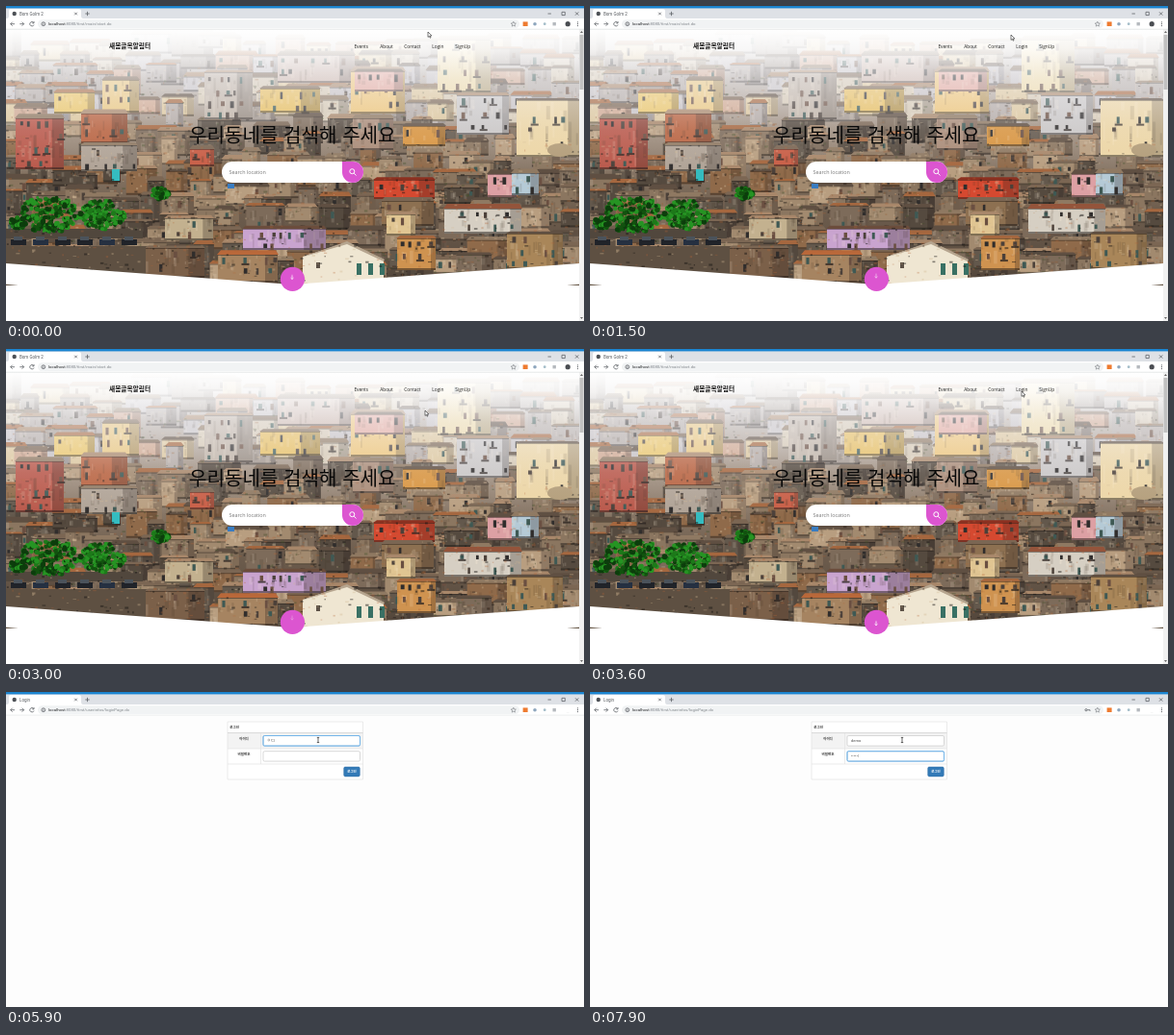
An HTML page with a canvas that plays this animation: 600 by 328 pixels, repeating every 8 s.

```html
<!DOCTYPE html>
<html lang="ko">
<head>
<meta charset="utf-8">
<title>Bom Golm 2</title>
<style>
html, body { margin: 0; width: 100%; height: 100%; overflow: hidden; background: #fff; }
canvas, svg { position: absolute; left: 0; top: 0; }
text { font-family: Roboto, "Noto Sans CJK KR", sans-serif; white-space: pre; }
.ko { font-family: "Noto Sans CJK KR", "Noto Sans CJK", sans-serif; }
.nav text { font: 500 4.8px "Open Sans", sans-serif; fill: #222; }
.url { font-size: 4.3px; fill: #80868b; }
.url tspan { fill: #202124; }
.tab { font-size: 4.5px; fill: #55595d; }
.label { font-size: 3.5px; font-weight: 700; fill: #333; }
.line { fill: none; stroke: #5f6368; stroke-width: .8; }
.field { fill: #fff; stroke: #c8c8c8; stroke-width: .7; }
.focus { fill: none; stroke: #66afe9; stroke-width: .8; filter: drop-shadow(0 0 .6px #9ccbf0); }
.typed { font-size: 4px; fill: #444; }

#login, #hover, #focus1, #focus2, #key, #pointer, #beam { animation: 8s step-end infinite; }
#login { animation-name: login; }
#hover { animation-name: hover; }
#focus1 { animation-name: focus1; }
#focus2 { animation-name: focus2; }
#key { animation-name: key; }
#pointer { animation-name: pointer; }
#beam { animation-name: beam; }
#cursor { animation: move 8s ease-in-out infinite; }
#arrow { animation: drop 1.6s -.3s ease-out infinite; }

@keyframes login { 0% { visibility: hidden } 50%, 100% { visibility: visible } }
@keyframes hover { 0% { opacity: 0 } 57.5%, 100% { opacity: 1 } }
@keyframes focus1 { 0% { opacity: 0 } 63.75% { opacity: 1 } 86.25%, 100% { opacity: 0 } }
@keyframes focus2 { 0% { opacity: 0 } 86.25%, 100% { opacity: 1 } }
@keyframes key { 0% { opacity: 0 } 88.75%, 100% { opacity: 1 } }
@keyframes pointer { 0% { opacity: 1 } 58%, 100% { opacity: 0 } }
@keyframes beam { 0% { opacity: 0 } 58%, 100% { opacity: 1 } }
@keyframes move {
  0%, 12% { transform: translate(438px, 27px) }
  17%, 19% { transform: translate(437px, 30px) }
  28%, 29% { transform: translate(344px, 91px) }
  37.5% { transform: translate(435px, 64px) }
  44%, 52.5% { transform: translate(448px, 44px) }
  60%, 100% { transform: translate(324px, 50px) }
}
@keyframes drop {
  0% { transform: translate(297px, 279px); opacity: 0 }
  25% { opacity: 1 }
  70% { opacity: 1 }
  100% { transform: translate(297px, 290px); opacity: 0 }
}
</style>
</head>
<body>
<canvas id="photo" width="600" height="328"></canvas>
<svg width="600" height="328" viewBox="0 0 600 328">
  <g id="home">
    <path d="M0 268L297 290L595 268V328H0Z" fill="#fff"/>
    <path d="M0 289.8L13 290.4L0 291ZM595 289.8L582 290.4L595 291Z" fill="#5d4d3c"/>
    <text class="ko" x="107" y="44.2" font-size="6.7" font-weight="700" fill="#111">새봄골목알림터</text>
    <g class="nav">
      <text x="361.4" y="43.7">Events</text><text x="388.2" y="43.7">About</text>
      <text x="413.3" y="43.7">Contact</text><text x="442.3" y="43.7">Login</text>
      <text x="466.3" y="43.7">SignUp</text>
    </g>
    <text class="ko" x="297.3" y="142.4" font-size="20.1" font-weight="300" text-anchor="middle" fill="#080808">우리동네를 검색해 주세요</text>
    <rect x="224" y="162" width="147" height="22" rx="11" fill="#fff"/>
    <text x="231.5" y="175" style="font:5.4px 'Open Sans',sans-serif" fill="#777">Search location</text>
    <path d="M349 162H360A11 11 0 0 1 360 184A11 11 0 0 1 349 173Z" fill="#dc55d0"/>
    <g fill="none" stroke="#fff"><circle cx="359.3" cy="172.2" r="2.5"/><path d="M361.2 174.1l2.3 2.3"/></g>
    <circle cx="297.4" cy="284.3" r="12.6" fill="#dc55d0"/>
    <path id="arrow" d="M0-2.5V2M-1.5 .5L0 2L1.5 .5" fill="none" stroke="#fff" stroke-width=".8"/>
    <rect x="595" y="24" width="5" height="304" fill="#f1f1f1"/>
    <rect x="595.5" y="30" width="4" height="57" fill="#c1c1c1"/>
    <path d="M596 28l1.5-2l1.5 2zM596 324l1.5 2l1.5-2z" fill="#666"/>
  </g>

  <g id="chrome">
    <rect width="600" height="24" fill="#fff"/>
    <rect width="600" height="13" fill="#dee1e6"/>
    <rect width="600" height="2.4" fill="#1c86d1"/>
    <path d="M1 13Q3 13 3 10V5Q3 3 5 3H75Q78 3 78 5V10Q78 13 80 13Z" fill="#fff"/>
    <circle cx="8.7" cy="8" r="2.2" fill="#4d5156"/>
    <path class="line" d="M71.2 6.7l2.6 2.6m0-2.6l-2.6 2.6M84.5 5.8v4.4M82.3 8h4.4M562.5 8h3.4M577 6.3h3.3v3.3H577zM591 6.3l3.3 3.3m0-3.3l-3.3 3.3"/>
    <rect x="33" y="14.3" width="500" height="8.7" rx="4.3" fill="#f1f3f4"/>
    <path class="line" d="M9 18.7H4.7m2-2l-2 2l2 2M14.3 18.7h4.3m-2-2l2 2l-2 2"/>
    <path class="line" d="M28.8 17.5a2.2 2.2 0 1 0 .2 2M29 16v1.9h-1.9"/>
    <circle class="line" cx="38.8" cy="18.7" r="1.9" stroke-width=".6"/>
    <path class="line" d="M38.8 18.3v1.5m0-2.4v.4"/>
    <path class="line" d="M526.8 16.2l.7 1.7l1.9.2l-1.4 1.2l.4 1.8l-1.6-1l-1.6 1l.4-1.8l-1.4-1.2l1.9-.2z" style="stroke-width:.5"/>
    <rect x="536.6" y="16.4" width="5" height="4.6" fill="#ee7b30"/>
    <circle cx="549" cy="18.7" r="1.8" fill="#8ea6bd"/>
    <circle cx="559.2" cy="18.7" r="1.4" fill="#a4bdc9"/>
    <rect x="567.5" y="17" width="3.4" height="3.4" fill="#b5b9be"/>
    <circle cx="583.2" cy="18.7" r="2.6" fill="#4a4d52"/>
    <g fill="#5f6368"><circle cx="593.5" cy="16.8" r=".6"/><circle cx="593.5" cy="18.7" r=".6"/><circle cx="593.5" cy="20.6" r=".6"/></g>
    <path d="M0 24.2H600" stroke="#dcdee0" stroke-width=".7"/>
    <text class="tab" x="14" y="9.6">Bom Golm 2</text>
    <text class="url" x="44" y="20.3"><tspan>localhost</tspan>:8080/first/main/start.do</text>
  </g>

  <g id="login">
    <rect y="24.6" width="600" height="303.4" fill="#fdfdfd"/>
    <rect x="13" y="4" width="50" height="8" fill="#fff"/>
    <text class="tab" x="14" y="9.6">Login</text>
    <rect x="43" y="15" width="120" height="7.4" fill="#f1f3f4"/>
    <text class="url" x="44" y="20.3"><tspan>localhost</tspan>:8080/first/userinfos/loginPage.do</text>
    <rect x="580" y="15.6" width="6.4" height="6.2" fill="#fff"/>
    <g id="key"><circle class="line" cx="515" cy="18.7" r="1.1"/><path class="line" d="M516.2 18.7h2.8v1.2"/></g>
    <rect x="230" y="31" width="140.5" height="60" fill="#fff"/>
    <rect id="hover" x="230" y="43" width="140.5" height="16" fill="#f3f3f3"/>
    <path d="M230 31H370.5V91H230ZM230 59H370.5M230 75H370.5M264.5 43V75" fill="none" stroke="#e2e2e2" stroke-width=".7"/>
    <path d="M230 42.6H370.5" stroke="#d8d8d8"/>
    <text class="ko label" x="232.3" y="38.4">로그인</text>
    <g text-anchor="middle">
      <text class="ko label" x="247" y="50.3">아이디</text>
      <text class="ko label" x="247" y="66.3">비밀번호</text>
    </g>
    <rect class="field" x="267" y="45.5" width="100.5" height="10.6" rx="1.4"/>
    <rect class="field" x="267" y="61.7" width="100.5" height="10.4" rx="1.4"/>
    <rect id="focus1" class="focus" x="267" y="45.5" width="100.5" height="10.6" rx="1.4"/>
    <rect id="focus2" class="focus" x="267" y="61.7" width="100.5" height="10.4" rx="1.4"/>
    <text id="user" class="typed" x="271" y="52.3"></text>
    <text id="pass" class="typed" x="271" y="68.4"></text>
    <rect x="350.7" y="78" width="16.6" height="10" rx="1.4" fill="#337ab7" stroke="#2e6da4" stroke-width=".5"/>
    <text class="ko label" x="359" y="84.3" text-anchor="middle" style="fill:#fff">로그인</text>
  </g>

  <g id="cursor">
    <path id="pointer" d="M0 0V5.4L1.3 4.3L2.2 6.2L3 5.8L2.2 4H3.9Z" fill="#fff" stroke="#222" stroke-width=".6"/>
    <path id="beam" d="M-1.2-2.6H1.2M0-2.6V2.6M-1.2 2.6H1.2" fill="none" stroke="#222" stroke-width=".7"/>
  </g>
</svg>
<script>
const g = document.getElementById("photo").getContext("2d");
let seed = 41;
const rand = () => (seed = (seed * 16807) % 2147483647) / 2147483647;
const between = (a, b) => a + rand() * (b - a);
const pick = list => list[Math.floor(rand() * list.length)];
const box = (x, y, w, h, color) => { g.fillStyle = color; g.fillRect(x, y, w, h); };
const shape = (color, ...points) => {
  g.fillStyle = color;
  g.beginPath();
  points.forEach(p => g.lineTo(...p));
  g.fill();
};
const gradient = (y0, y1, ...stops) => {
  const fill = g.createLinearGradient(0, y0, 0, y1);
  stops.forEach(([at, color]) => fill.addColorStop(at, color));
  return fill;
};
const roofs = ["#a5673f", "#8f7962", "#a8876a", "#5f4f42", "#7b6653"];

// Weathered wall with a sloping roof, scattered windows and a few balconies.
function house(x, y, w, h, color, { roof = pick(roofs), windows = .6 } = {}) {
  const pitch = between(1, 4), side = w * between(.12, .35);
  box(x, y, w, h, color);
  for (let i = 0; i < w / 4; i++)
    box(between(x, x + w - 3), between(y, y + h * .6), between(1, 4), between(2, h * .4), pick(["rgba(60,45,30,.14)", "rgba(255,240,215,.14)"]));
  box(x + w - side, y, side, h, "rgba(40,30,28,.28)");
  shape(roof, [x - 1, y + 1], [x + 3, y - pitch], [x + w - 2, y - pitch], [x + w + 1, y + 1]);
  box(x, y + 1, w, 1, "rgba(35,28,24,.45)");
  box(x, y + h - 2, w, 2, "rgba(35,28,24,.5)");
  for (let wy = y + between(4, 6); wy < y + h - 6; wy += between(11, 15))
    for (let wx = x + between(3, 6); wx < x + w - 4; wx += between(7, 14)) {
      if (rand() > windows) continue;
      const tall = between(4, 8);
      box(wx, wy, between(2.4, 4), tall, pick(["#302d2c", "#4b4039", "#3e5954", "#6a4f41"]));
      if (rand() < .25) box(wx - 2, wy + tall, 8, 2, "rgba(45,38,34,.8)");
    }
}

function tree(x, y, radius) {
  for (let i = 0; i < radius * 7; i++) {
    const angle = rand() * 6.28, r = radius * Math.sqrt(rand());
    g.fillStyle = pick(["#12520f", "#1d7a1a", "#269423", "#0c3d0c"]);
    g.beginPath();
    g.arc(x + r * Math.cos(angle), y + r * .65 * Math.sin(angle), between(1.2, 3), 0, 7);
    g.fill();
  }
}

function grain(count, top, bottom, colors) {
  for (let i = 0; i < count; i++)
    box(rand() * 595, between(top, bottom), between(1, 4), between(.7, 2.2), pick(colors));
}

function paintPhoto() {
  box(0, 24, 595, 267, gradient(24, 290, [0, "#d2d0d0"], [.4, "#9f8e7e"], [.7, "#6f5e4e"], [1, "#51453a"]));
  const far = ["#d5c8b3", "#b3aaa5", "#dcc69c", "#c5c0c2", "#a2978e", "#cfa78f"];
  const near = ["#8b7660", "#a28a6f", "#63584c", "#b89e80", "#7d6b5a", "#554a3f", "#8f6a4a"];
  for (let y = 32; y < 280; y += 18)
    for (let x = -12; x < 595; x += between(18, 42))
      house(x, y + between(-8, 8), between(16, 46), between(14, 30), pick(y < 115 ? far : near), { windows: .3 });
  grain(1800, 60, 290, ["rgba(38,30,25,.5)", "rgba(215,190,155,.4)", "rgba(150,95,55,.4)", "rgba(72,83,45,.4)"]);

  house(448, 34, 55, 56, "#edd9a6");
  house(282, 50, 80, 30, "#cab4a9");
  house(358, 67, 56, 45, "#edc477");
  house(362, 67, 50, 22, "#e1a69b");
  house(100, 76, 38, 35, "#e9c67e");
  house(50, 89, 42, 23, "#eac567");
  house(206, 68, 50, 50, "#bfb2a5");
  house(264, 85, 62, 26, "#e6bd5d");
  house(468, 92, 54, 42, "#c9c6c5");
  house(530, 97, 65, 60, "#ecd5a4", { windows: .35 });
  house(10, 116, 50, 54, "#b9584a");
  house(78, 111, 48, 32, "#b8623f");
  house(78, 144, 58, 28, "#b0a396");
  house(412, 124, 44, 22, "#d8943f");
  house(360, 116, 42, 34, "#a98b77");
  house(191, 148, 25, 19, "#c85d45");
  house(382, 180, 63, 21, "#d54930", { roof: "#8c3020" });
  house(500, 174, 30, 25, "#dda0a4");
  house(525, 173, 28, 24, "#b5cad6");
  house(390, 202, 54, 27, "#8d7051");
  house(395, 216, 30, 23, "#e0c592");
  house(455, 210, 80, 27, "#d6cfc3", { roof: "#94543b" });
  house(165, 220, 50, 24, "#c3b18f");
  house(246, 231, 86, 23, "#c9a4cf", { roof: "#6b4d3c" });
  house(520, 236, 58, 38, "#a98659");
  house(144, 251, 62, 32, "#7b6049");
  house(220, 258, 62, 30, "#a68461", { roof: "#b9683a" });
  house(406, 241, 40, 34, "#cf9350");
  shape("#efe6d2", [308, 261], [354, 246], [392, 264], [392, 291], [308, 291]);
  shape("#b6a58f", [306, 262], [354, 245], [393, 264], [392, 266], [354, 248]);
  for (let x = 364; x < 390; x += 12) box(x, 268, 5, 12, "#397064");
  box(322, 267, 4, 6, "#5c5147");
  box(110, 170, 8, 12, "#35bcc0");
  box(230, 185, 7, 5, "#3a7cc0");

  box(0, 232, 142, 10, "#51473d");
  box(0, 250, 145, 32, "#5e5042");
  grain(1100, 135, 290, ["rgba(25,22,20,.5)", "rgba(205,180,145,.35)", "rgba(180,100,55,.3)"]);
  tree(44, 217, 30);
  tree(101, 217, 24);
  tree(160, 195, 9);
  tree(13, 226, 9);
  for (let x = 5; x < 130; x += 23) {
    box(x, 243, 16, 6, pick(["#202329", "#394049", "#253041"]));
    box(x + 3, 240, 9, 4, "#4b535b");
  }
  g.fillStyle = "#b29c78";
  g.beginPath();
  g.ellipse(575, 150, 13, 7, 0, 0, 7);
  g.fill();
  box(0, 24, 595, 150, gradient(24, 174, [0, "#fff"], [.14, "rgba(255,255,255,.88)"],
    [.35, "rgba(248,249,253,.5)"], [.7, "rgba(245,246,252,.14)"], [1, "rgba(255,255,255,0)"]));
}
paintPhoto();

const typing = {
  user: [[5100, "|"], [5500, "ㅇ|"], [5800, "ㅇㄷ|"], [6100, "|"], [6200, "d|"], [6350, "de|"], [6500, "dem|"], [6650, "demo|"], [6900, "demo"]],
  pass: [[6900, "|"], [7100, "•|"], [7300, "••|"], [7500, "•••|"], [7650, "••••|"], [7800, "•••••|"]]
};
function frame() {
  const t = performance.now() % 8000;
  for (const id in typing) {
    const step = typing[id].filter(([at]) => at <= t).pop();
    document.getElementById(id).textContent = step ? step[1] : "";
  }
  requestAnimationFrame(frame);
}
frame();
</script>
</body>
</html>
```
